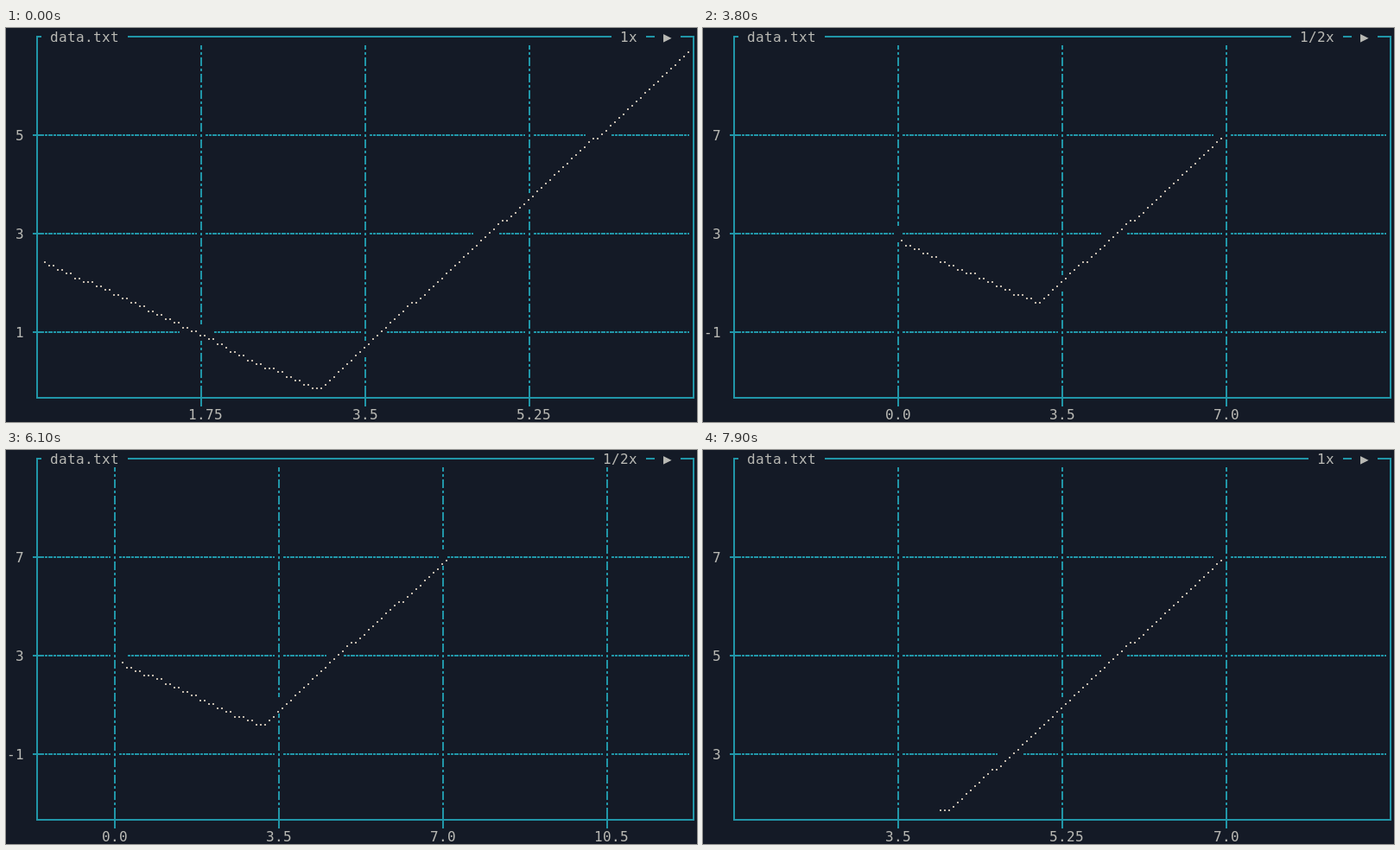
Animation of 800x456 px, one loop 8 s. Source, as an HTML page with a canvas:

```html
<!DOCTYPE html>
<html lang="en">
<head>
<meta charset="utf-8">
<title>data.txt</title>
<style>
html, body { margin: 0; width: 100%; height: 100%; overflow: hidden; background: #141a26; }
canvas { display: block; width: 800px; height: 456px; }
</style>
</head>
<body>
<canvas id="plot" width="800" height="456"></canvas>
<script>
const ctx = document.getElementById('plot').getContext('2d');
const CW = 10, CH = 19, PAD = 1;
const BG = '#141a26', GRID = '#2196a8', INK = '#b9b9b4', DOT = '#c3b9ac';
const LEFT = 3, RIGHT = 79, BOTTOM = 22, LOOP = 8000;
const ROWS = [6, 12, 18];
const DOT_Y = [4, 8, 13, 17];

// A curve falls from level `from` to `low` in runs of two dots, then climbs
// one dot at a time to `to`. `odd` holds other run lengths on the way down,
// `twice` the levels that take two dots on the way up. `start` is the first
// dot column, two per character.
const full = {
  zoom: '1x', ticks: { 22: '1.75', 41: '3.5', 60: '5.25' }, levels: [5, 3, 1],
  start: 8, from: 52, low: 83, to: 1,
  odd: { 52: 1, 57: 3, 73: 1, 78: 3, 83: 3 }, twice: [62, 42, 22]
};
const half = {
  zoom: '1/2x', ticks: { 22: '0.0', 41: '3.5', 60: '7.0' }, levels: [7, 3, -1],
  start: 45, from: 47, low: 62, to: 22,
  odd: { 47: 1, 55: 3, 60: 3 }, twice: [52, 42]
};
const halfRight = {
  ...half, ticks: { 12: '0.0', 31: '3.5', 50: '7.0', 69: '10.5' },
  start: 26, odd: { 47: 1, 50: 3, 60: 3, 62: 3 }, twice: [42, 32]
};
const halfLeft = {
  ...half, ticks: { 12: '-3.5', 31: '0.0', 50: '3.5', 69: '7.0' },
  start: 63, odd: { 47: 1, 50: 3, 55: 3, 62: 3 }, twice: [52, 32]
};
const fullRight = {
  ...full, ticks: { 22: '3.5', 41: '5.25', 60: '7.0' },
  start: 8, from: 70, odd: { 70: 1, 73: 1, 78: 3 }, twice: [62, 52, 42]
};
const fullUp = {
  ...fullRight, levels: [6, 4, 2],
  start: 43, from: 83, to: 12, odd: { 83: 3 }, twice: [62, 42, 22]
};
const fullTop = {
  ...fullUp, levels: [7, 5, 3], start: 54, to: 22, twice: [73, 42]
};

const timeline = [
  [0, full], [900, half], [3200, halfRight], [3800, half], [4900, halfLeft],
  [5400, half], [6100, halfRight], [6900, fullRight], [7500, fullUp], [7900, fullTop]
];

function text(col, row, s) {
  ctx.fillStyle = INK;
  [...String(s)].forEach((c, i) => ctx.fillText(c, (col + i) * CW + PAD, row * CH + 15 + PAD));
}

function hLine(row, c0, c1) {
  ctx.fillRect(c0 * CW + PAD, row * CH + 9, (c1 - c0) * CW, 2);
}

function vLine(col, r0, r1) {
  ctx.fillRect(col * CW + 5, r0 * CH + PAD, 2, (r1 - r0) * CH);
}

function hDash(col, row) {
  const x = col * CW + PAD, y = row * CH + 9;
  ctx.fillRect(x, y, 3, 2);
  ctx.fillRect(x + 4, y, 3, 2);
  ctx.fillRect(x + 8, y, 2, 2);
}

function vDash(col, row) {
  const x = col * CW + 5, y = row * CH + PAD;
  ctx.fillRect(x, y, 2, 5);
  ctx.fillRect(x, y + 8, 2, 3);
  ctx.fillRect(x, y + 14, 2, 5);
}

function curve(v) {
  const dots = [];
  let x = v.start;
  const run = (level, n) => { while (n--) dots.push([x++, level]); };
  for (let k = v.from; k <= v.low; k++) run(k, v.odd[k] || 2);
  for (let k = v.low - 1; k >= v.to; k--) run(k, v.twice.includes(k) ? 2 : 1);
  return dots;
}

function drawFrame(v) {
  const zoomCol = 73 - v.zoom.length;
  ctx.fillStyle = GRID;
  ctx.fillRect(LEFT * CW + 5, 9, 6, 2);
  hLine(0, 14, zoomCol - 1);
  hLine(0, 74, 75);
  hLine(0, 78, 79);
  ctx.fillRect(RIGHT * CW + PAD, 9, 6, 2);
  ctx.fillRect(LEFT * CW + 5, 9, 2, 420);
  ctx.fillRect(RIGHT * CW + 5, 9, 2, 420);
  ctx.fillRect(LEFT * CW + 5, BOTTOM * CH + 9, 762, 2);
  text(5, 0, 'data.txt');
  text(zoomCol, 0, v.zoom);
  text(76, 0, '▶');
}

function drawGrid(v, used) {
  const cols = Object.keys(v.ticks).map(Number);
  const free = (c, r) => !used.has(c + ',' + r);
  ctx.fillStyle = GRID;
  for (const r of ROWS) {
    hLine(r, LEFT, LEFT + 1);
    for (let c = LEFT + 1; c < RIGHT; c++) if (!cols.includes(c) && free(c, r)) hDash(c, r);
  }
  for (const c of cols) {
    vLine(c, BOTTOM, BOTTOM + 1);
    for (let r = 1; r < BOTTOM; r++) if (free(c, r)) vDash(c, r);
  }
  cols.forEach(c => text(c - 1, 23, v.ticks[c]));
  v.levels.forEach((n, i) => text(2 - String(n).length, ROWS[i], n));
}

function draw(v) {
  ctx.fillStyle = BG;
  ctx.fillRect(0, 0, 800, 456);
  ctx.font = '16px "DejaVu Sans Mono", monospace';
  const dots = curve(v);
  const used = new Set(dots.map(([x, k]) => (x >> 1) + ',' + ((k >> 2) + 1)));
  drawFrame(v);
  drawGrid(v, used);
  ctx.fillStyle = DOT;
  for (const [x, k] of dots) ctx.fillRect(x * 5 + 4, ((k >> 2) + 1) * CH + DOT_Y[k & 3], 2, 2);
}

const t0 = performance.now();
function tick() {
  const t = (performance.now() - t0) % LOOP;
  draw(timeline.filter(([at]) => at <= t).pop()[1]);
  requestAnimationFrame(tick);
}
tick();
</script>
</body>
</html>
```
